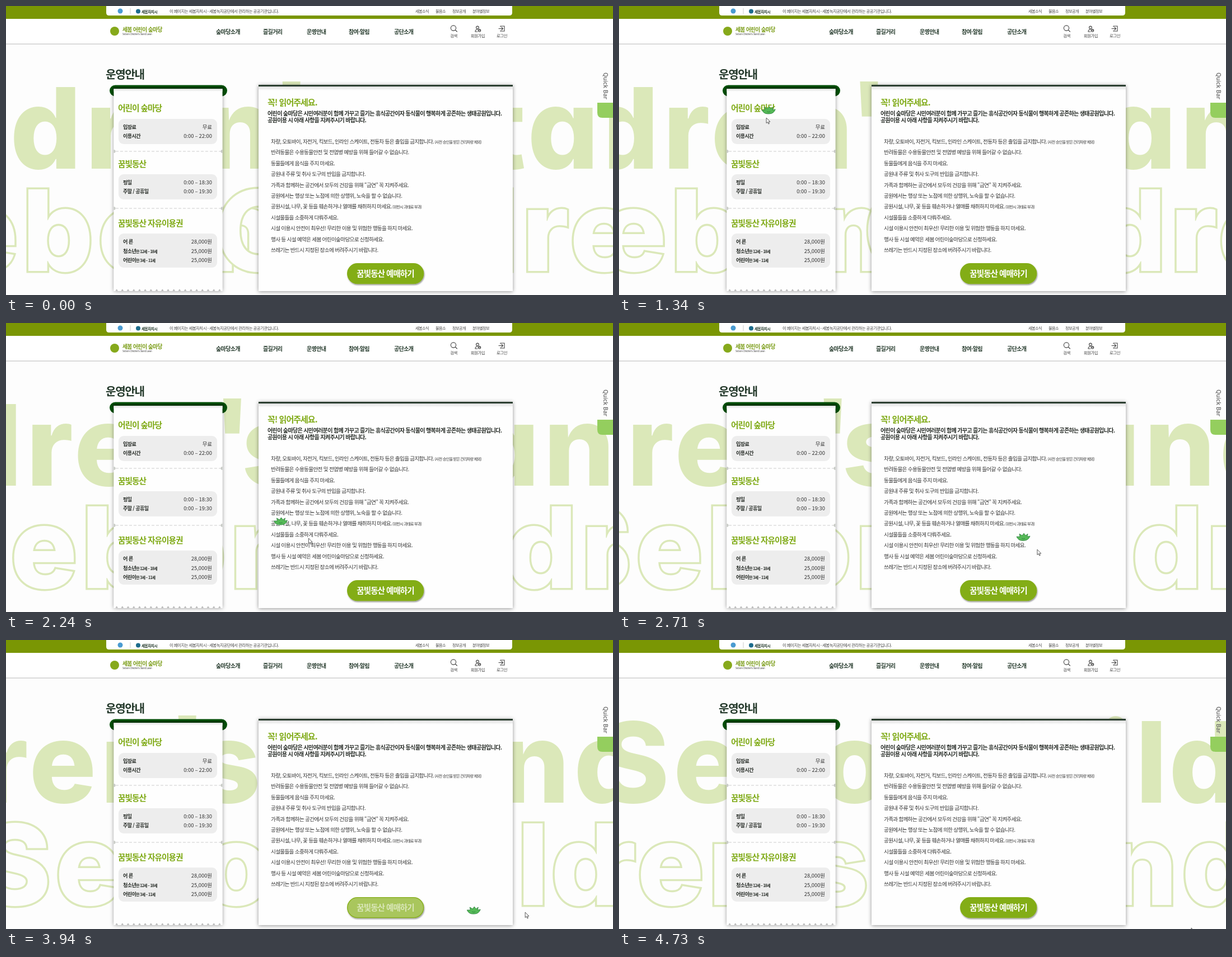
An HTML page for the animation above (4.8 s loop, 1084x517 px).

```html
<!DOCTYPE html>
<html lang="ko">
<head>
<meta charset="utf-8">
<title>운영안내</title>
<style>
  html, body { margin: 0; width: 100%; height: 100%; overflow: hidden; background: #fdfdfd; }
  svg { display: block; width: 1084px; height: 517px; }
  text { font-family: "Noto Sans CJK KR", "Noto Sans CJK", sans-serif; letter-spacing: -.07em; fill: #262b26; white-space: pre; }
  .num { letter-spacing: 0; }
  .b { font-weight: 700; }
  .big text { font: 800 200px Inter, sans-serif; letter-spacing: 7px; font-feature-settings: "cv11"; }
  .solid text { fill: #dbe8b9; }
  .outline text { fill: #fdfdfd; stroke: #dbe8b9; stroke-width: 7; paint-order: stroke; }
  .icon { fill: none; stroke: #444; stroke-width: 1.1; stroke-linecap: round; }
</style>
</head>
<body>
<svg viewBox="0 0 1084 517" xmlns="http://www.w3.org/2000/svg">
  <defs>
    <filter id="soft" x="-10%" y="-10%" width="120%" height="120%">
      <feDropShadow dx="0" dy="1" stdDeviation="3.5" flood-color="#000" flood-opacity=".42"/>
    </filter>
    <filter id="lift" x="-10%" y="-20%" width="120%" height="160%">
      <feDropShadow dx="1" dy="2" stdDeviation="1.3" flood-color="#000" flood-opacity=".4"/>
    </filter>
    <linearGradient id="shade" x2="0" y2="1">
      <stop offset="0" stop-color="#dedede"/><stop offset="1" stop-color="#fefefe"/>
    </linearGradient>
  </defs>
  <rect width="1084" height="517" fill="#fdfdfd"/>

  <g id="upper" class="big solid"></g>
  <g id="lower" class="big outline"></g>

  <rect width="1084" height="23" fill="#7a9604"/>
  <path d="M179 0H904V12Q904 17 899 17H184Q179 17 179 12Z" fill="#fff"/>
  <rect y="23" width="1084" height="45" fill="#fff"/>
  <rect y="67" width="1084" height="2" fill="#dadada"/>
  <circle cx="204" cy="9" r="4.5" fill="#4a9bd1"/>
  <path d="M222 4V14" stroke="#ccc"/>
  <circle cx="236" cy="9.5" r="4" fill="#1d6c8c"/>
  <circle cx="194" cy="45" r="8" fill="#86a91b"/>

  <g class="icon">
    <circle cx="799" cy="39.5" r="4.6"/><path d="M802.5 43L805.5 46"/>
    <circle cx="842" cy="38.5" r="2.4"/><path d="M838 46Q838 42 842 42M838 46H842"/>
    <circle cx="845.5" cy="43.8" r="2.2"/><path d="M844.5 43.8H846.5"/>
    <path d="M883 37V36H890V45H883V44M880 40.5H887M885 38L887.5 40.5L885 43"/>
  </g>

  <path d="M1084 173H1056V191Q1056 200 1065 200H1084Z" fill="#94ce5e"/>
  <text class="num" transform="translate(1067 119) rotate(90)" font-size="10.2"
    style="font-family:'Open Sans',sans-serif;font-weight:600;fill:#6a6a6a">Quick Bar</text>

  <rect x="185" y="141.5" width="210" height="20" rx="10" fill="#034f08"/>
  <rect x="190" y="145" width="200" height="6" rx="3" fill="#023c06"/>
  <path id="ticket" fill="#fefefe" filter="url(#soft)"/>
  <rect x="192.5" y="148" width="194" height="5" fill="url(#shade)"/>
  <g id="ticketParts"></g>

  <rect x="451" y="141" width="454" height="369" fill="#fefefe" filter="url(#soft)"/>
  <rect x="451" y="144" width="454" height="7" fill="url(#shade)"/>
  <rect x="451" y="141" width="454" height="3" fill="#2c3f31"/>
  <g id="labels"></g>

  <g id="button">
    <rect x="609.7" y="460.7" width="136" height="36" rx="18" stroke="#83ad16" stroke-width="1.3" filter="url(#lift)"/>
    <text class="b" x="677.5" y="484" font-size="14.6" text-anchor="middle">꿈빛동산 예매하기</text>
  </g>

  <g id="buddy" stroke="#277a3a" stroke-width=".8" stroke-linejoin="round">
    <path d="M-12 -1L-6 -1L-7 -6L-2 -3L1 -7L4 -3L8 -6L7 -1L12 -2Q9 6 1 6H-2Q-9 6 -12 -1Z" fill="#55b957"/>
    <path d="M-3 2Q0 4 3 2" fill="none"/>
  </g>
  <path id="arrow" d="M0 0V9.5L2.2 7.5L3.8 11L5.3 10.3L3.8 7H6.8Z" fill="#fff" stroke="#333" stroke-width=".8"/>
  <path id="hand" d="M-1.5 -4Q0 -6 1 -4L2 0L7 1Q9 2 8 6L7 10H1L-4 4Q-4 2 -2 3L0 4Z" fill="#fff" stroke="#333" stroke-width=".8"/>
</svg>
<script>
const NS = "http://www.w3.org/2000/svg";
const $ = id => document.getElementById(id);

function add(parent, tag, attrs, content = "") {
  const el = document.createElementNS(NS, tag);
  for (const key in attrs) el.setAttribute(key, attrs[key]);
  el.textContent = content;
  return parent.appendChild(el);
}

function label(x, y, size, content, color = "#262b26", cls = "", anchor = "start") {
  return add($("labels"), "text",
    { x, y, "font-size": size, class: cls, "text-anchor": anchor, style: `fill:${color}` }, content);
}

// Marquee lines
function marquee(group, y) {
  const word = (x, str, dy = 0, anchor = "start") =>
    add(group, "text", { x, y: y + dy, "text-anchor": anchor }, str);
  word(-28, "Sebom");
  word(1000, "Chil", 0, "end");
  word(996, "dren");
  word(1463, "'", -10);
  word(1515, "s");
  word(1924, "St", 0, "end");
  word(1920, "and");
}
marquee($("upper"), 291);
marquee($("lower"), 474);

// Ticket with a scalloped lower edge
const scallops = 19, left = 192.5, step = 194 / scallops;
let edge = `M${left} 148H386.5V510`;
for (let i = scallops; i > 0; i--) {
  const x = left + i * step;
  edge += `H${x - 2.5}Q${x - step / 2} 503 ${x - step + 2.5} 510`;
}
$("ticket").setAttribute("d", edge + `H${left}Z`);

const parts = $("ticketParts");
for (const [y, h] of [[202, 45], [301, 45], [407, 61]])
  add(parts, "rect", { x: 201, y, width: 176, height: h, rx: 9, fill: "#ededed" });
for (const y of [260, 362]) {
  add(parts, "path", { d: `M196 ${y}H384`, stroke: "#ddd", "stroke-width": 1.3, "stroke-dasharray": "5 3" });
  add(parts, "path", {
    d: `M192.5 ${y - 3}a3 3 0 0 1 0 6ZM386.5 ${y - 3}a3 3 0 0 0 0 6Z`, fill: "#c6c9c4"
  });
}

// Header
const green = "#80ab18", dark = "#253a2c", gray = "#444";
label(242, 12.5, 6.6, "세봄자치시", dark, "b");
label(292, 11.7, 7.4, "이 페이지는 세봄자치시 - 세봄녹지공단에서 관리하는 공공기관입니다.", gray);
[[731, "세봄소식"], [767, "물음소"], [797, "정보공개"], [833, "분야별정보"]]
  .forEach(([x, s]) => label(x, 11.7, 7.1, s, gray));
label(208, 46, 9.8, "세봄 어린이 숲마당", "#7a9c16", "b");
label(208, 52, 4.3, "Sebom Children's Stand Lawn", gray);
[[375, "숲마당소개"], [459, "즐길거리"], [537, "운영안내"], [612, "참여·알림"], [693, "공단소개"]]
  .forEach(([x, s]) => label(x, 50, 10.1, s, dark, "b"));
[[799.5, "검색"], [842.5, "회원가입"], [885.5, "로그인"]]
  .forEach(([x, s]) => label(x, 55.8, 7.4, s, gray, "", "middle"));
label(178, 130, 20.2, "운영안내", dark, "b");

// Ticket text
[[188, "어린이 숲마당"], [287.5, "꿈빛동산"], [393.5, "꿈빛동산 자유이용권"]]
  .forEach(([y, s]) => label(200, y, 14.7, s, green, "b"));
[
  [219.5, "입장료", "무료"], [236, "이용시간", "0:00 – 22:00"],
  [318.5, "평일", "0:00 – 18:30"], [335, "주말 / 공휴일", "0:00 – 19:30"],
  [425, "어 른", "28,000원"],
  [441.5, "청소년", "25,000원", "만 12세 – 18세"], [458, "어린이", "25,000원", "만 3세 – 11세"]
].forEach(([y, name, value, age]) => {
  const el = label(209, y, 9.1, name, "#262b26", "b");
  if (age) add(el, "tspan", { "font-size": 6.9 }, age);
  label(368, y, 9.4, value, "#333", "num", "end");
});

// Notice
label(467, 178, 15.1, "꼭! 읽어주세요.", green, "b");
label(467, 196, 10.1, "어린이 숲마당은 시민여러분이 함께 가꾸고 즐기는 휴식공간이자 동식물이 행복하게 공존하는 생태공원입니다.", "#262b26", "b");
label(467, 208, 10.1, "공원이용 시 아래 사항을 지켜주시기 바랍니다.", "#262b26", "b");
[
  ["차량, 오토바이, 자전거, 킥보드, 인라인 스케이트, 전동차 등은 출입을 금지합니다.", " (사전 승인을 받은 관리차량 제외)"],
  ["반려동물은 수용동물안전 및 전염병 예방을 위해 들어갈 수 없습니다."],
  ["동물들에게 음식을 주지 마세요."],
  ["공원내 주류 및 취사 도구의 반입을 금지합니다."],
  ["가족과 함께하는 공간에서 모두의 건강을 위해 “금연” 꼭 지켜주세요."],
  ["공원에서는 행상 또는 노점에 의한 상행위, 노숙을 할 수 없습니다."],
  ["공원시설, 나무, 꽃 등을 훼손하거나 열매를 채취하지 마세요.", " (위반시 과태료 부과)"],
  ["시설물들을 소중하게 다뤄주세요."],
  ["시설 이용시 안전이 최우선! 무리한 이용 및 위험한 행동을 하지 마세요."],
  ["행사 등 시설 예약은 세봄 어린이숲마당으로 신청하세요."],
  ["쓰레기는 반드시 지정된 장소에 버려주시기 바랍니다."]
].forEach(([rule, note], i) => {
  const el = label(473, 246 + i * 19.4, 9.6, rule, "#333");
  if (note) add(el, "tspan", { "font-size": 7 }, note);
});

// Motion
const LOOP = 4800, RESTART = 4435, SPEED = 0.0472, SPAN = 1198;
const HOVER_IN = 2950, HOVER_OUT = 3820;
// Keys: time, x, y
const pointerPath = [
  [100, 760, 530], [350, 640, 330], [600, 420, 165], [810, 269, 149], [1300, 255, 190],
  [1830, 360, 320], [2240, 540, 385], [2710, 747, 405], [2950, 735, 460], [3410, 707, 470],
  [3790, 715, 472], [3940, 927, 487], [4400, 1000, 505], [4730, 1022, 515], [4800, 1024, 519]
];
const buddyPath = [
  [150, 790, 540], [350, 690, 390], [600, 520, 190], [810, 336, 150], [1300, 262, 180],
  [1830, 330, 269], [2240, 490, 355], [2710, 722, 383], [3000, 732, 455], [3410, 715, 472],
  [3820, 718, 473], [3940, 835, 484], [4400, 970, 503], [4600, 1010, 535]
];

function along(path, t) {
  const i = path.findIndex(key => key[0] > t);
  if (i === 0) return path[0].slice(1);
  if (i < 0) return path[path.length - 1].slice(1);
  const [a, b] = [path[i - 1], path[i]];
  const k = (t - a[0]) / (b[0] - a[0]);
  return [a[1] + (b[1] - a[1]) * k, a[2] + (b[2] - a[2]) * k];
}

const move = (id, x, y) => $(id).setAttribute("transform", `translate(${x} ${y})`);
const mix = (a, b, k) => `rgb(${a.map((v, i) => Math.round(v + (b[i] - v) * k))})`;

function ramp(t, start) {
  const k = Math.min(1, Math.max(0, (t - start) / 300));
  return 1 - (1 - k) ** 2.3;
}

function render(t) {
  const travelled = SPEED * (t - RESTART) + (t < RESTART ? SPAN : 0);
  move("upper", -travelled, 0);
  move("lower", travelled - SPAN, 0);

  const hover = ramp(t, HOVER_IN) - ramp(t, HOVER_OUT);
  const lime = [131, 173, 22], white = [255, 255, 255];
  const [face, caption] = $("button").children;
  face.setAttribute("fill", mix(lime, white, hover));
  caption.style.fill = mix(white, lime, hover);

  const pressing = t > HOVER_IN && t < HOVER_OUT;
  move("arrow", ...along(pointerPath, t));
  move("hand", ...along(pointerPath, t));
  move("buddy", ...along(buddyPath, t));
  $("arrow").style.display = pressing ? "none" : "";
  $("hand").style.display = pressing ? "" : "none";
}

const began = performance.now();
function tick() {
  render((performance.now() - began) % LOOP);
  requestAnimationFrame(tick);
}
render(0);
requestAnimationFrame(tick);
</script>
</body>
</html>
```
